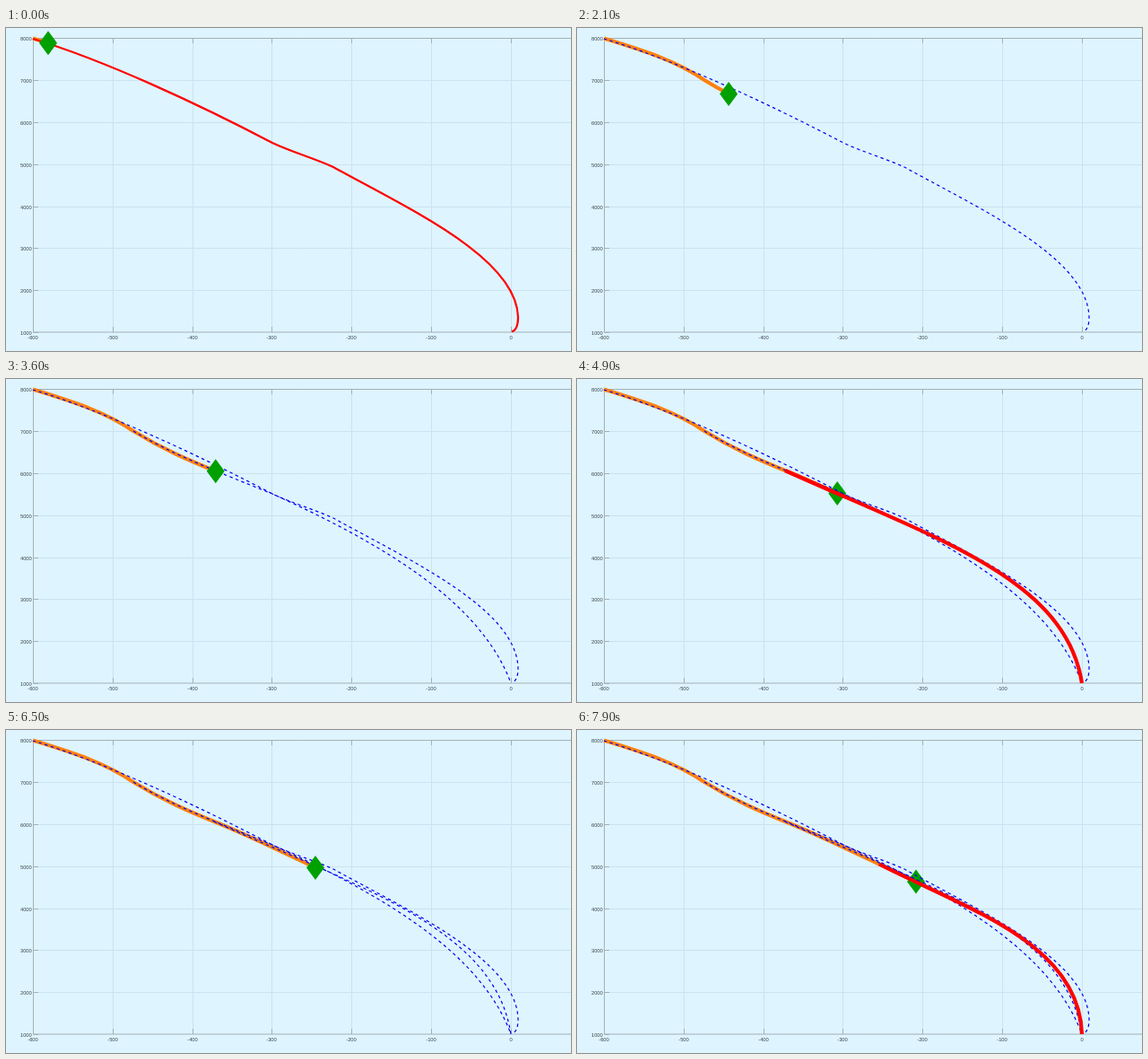
These frames come from a looping animation (630x360 px, 8000 ms). An HTML page with a canvas:

```html
<!DOCTYPE html>
<html lang="en">
<head>
<meta charset="utf-8">
<title>Trajectory replanning</title>
<style>
html, body { margin: 0; width: 100%; height: 100%; overflow: hidden; background: #def4ff; }
canvas { display: block; width: 630px; height: 360px; }
</style>
</head>
<body>
<canvas id="stage" width="630" height="360"></canvas>
<script>
const ctx = document.getElementById("stage").getContext("2d");
const LOOP = 8000, TICK = 100, REPLAN = 2430, LIFT = 700;
const RED = "#ff0000", ORANGE = "#ff8010", BLUE = "#0000f0", GREEN = "#00a000";
const GRID = "#cae3ee", AXIS = "#a3b0b6", TEXT = "#3c4448";

// Chains of cubic Béziers: start point, then two controls and an end per segment
const plans = [
  [30, 12, 110, 36, 215, 85, 297, 128, 318, 138, 343, 145, 365, 155,
    450, 202, 569, 256, 571, 322, 571, 331, 569, 337, 564, 338.5],
  [142, 58, 185, 84, 240, 105, 297, 128, 425, 186, 530, 250, 563, 339],
  [232, 102, 398, 177, 545, 222, 563, 339],
  [337, 149.5, 438, 201, 560, 238, 563, 339]
];
const track = [30, 11.5, 70, 24, 108, 35, 142, 58, 176, 79, 205, 91, 232, 102, 280, 121, 330, 147, 380, 170];

// Marker x over time
const pace = [[0, 47], [1300, 135], [2800, 199], [5700, 325], [6900, 355], [7900, 378]];

function markerX(t) {
  let i = 1;
  while (i < pace.length - 1 && pace[i][0] < t) i++;
  const [t0, x0] = pace[i - 1], [t1, x1] = pace[i];
  return x0 + (x1 - x0) * Math.min(1, (t - t0) / (t1 - t0));
}

function bezier(a, b, c, d, u) {
  const v = 1 - u;
  return v * v * v * a + 3 * v * v * u * b + 3 * v * u * u * c + u * u * u * d;
}

// Height of a left-to-right chain at x, by bisection
function heightAt(path, x) {
  let i = 0;
  while (i + 8 < path.length && path[i + 6] < x) i += 6;
  const at = (k, u) => bezier(path[i + k], path[i + k + 2], path[i + k + 4], path[i + k + 6], u);
  let lo = 0, hi = 1;
  for (let n = 0; n < 20; n++) {
    const mid = (lo + hi) / 2;
    if (at(0, mid) < x) lo = mid; else hi = mid;
  }
  return at(1, lo);
}

function drawCurve(path, color, width, dash = []) {
  ctx.strokeStyle = color;
  ctx.lineWidth = width;
  ctx.setLineDash(dash);
  ctx.beginPath();
  ctx.moveTo(path[0], path[1]);
  for (let i = 2; i < path.length; i += 6) ctx.bezierCurveTo(...path.slice(i, i + 6));
  ctx.stroke();
  ctx.setLineDash([]);
}

function line(x1, y1, x2, y2, color) {
  ctx.strokeStyle = color;
  ctx.lineWidth = 1;
  ctx.beginPath();
  ctx.moveTo(x1, y1);
  ctx.lineTo(x2, y2);
  ctx.stroke();
}

function label(value, x, y, align) {
  ctx.fillStyle = TEXT;
  ctx.textAlign = align;
  ctx.fillText(String(value), x, y);
}

function drawAxes() {
  ctx.fillStyle = "#def4ff";
  ctx.fillRect(0, 0, 630, 360);
  const gridX = i => Math.round(30 + i * 88.75) + 0.5;
  const gridY = i => Math.round(11.3 + i * 46.8) + 0.5;
  const left = gridX(0), top = gridY(0), bottom = 339;

  for (let i = 1; i < 7; i++) {
    line(gridX(i), top, gridX(i), bottom, GRID);
    line(left, gridY(i), 630, gridY(i), GRID);
  }
  line(left, top, left, bottom, AXIS);
  line(left, top, 630, top, AXIS);
  line(left, bottom, 630, bottom, AXIS);

  ctx.font = "5.8px 'Liberation Sans', Arial, sans-serif";
  ctx.textBaseline = "middle";
  for (let i = 0; i < 8; i++) {
    line(left, gridY(i), left + 5.5, gridY(i), AXIS);
    label(8000 - i * 1000, 28.8, gridY(i) + 0.5, "right");
  }
  for (let i = 0; i < 7; i++) {
    line(gridX(i), bottom - 6, gridX(i), bottom, AXIS);
    line(gridX(i), top, gridX(i), top + 5.5, AXIS);
    label(i * 100 - 600, gridX(i) - 0.5, 345.5, "center");
  }
}

function drawTrack(x) {
  ctx.save();
  ctx.beginPath();
  ctx.rect(0, 0, x, 360);
  ctx.clip();
  drawCurve(track, ORANGE, 4.2);
  ctx.restore();
}

function drawMarker(x, y) {
  ctx.fillStyle = GREEN;
  ctx.beginPath();
  ctx.moveTo(x, y - 13.5);
  ctx.lineTo(x + 10, y);
  ctx.lineTo(x, y + 13.5);
  ctx.lineTo(x - 10, y);
  ctx.fill();
}

function draw(ms) {
  const t = Math.floor(ms / TICK) * TICK;
  const x = markerX(t), y = heightAt(track, x);
  const n = Math.floor(t / REPLAN);

  // A plan is dropped once the marker reaches the start of the next one
  const active = n + 1 >= plans.length || x < plans[n + 1][0];
  const under = active && n > 0 && t % REPLAN < LIFT;

  drawAxes();
  drawTrack(x);
  if (under) drawMarker(x, y);
  plans.slice(0, active ? n : n + 1).forEach(p => drawCurve(p, BLUE, 1.2, [3.5, 3.5]));
  if (active) drawCurve(plans[n], RED, n ? 4.2 : 2.2);
  if (!under) drawMarker(x, y);
}

const start = performance.now();
function loop() {
  draw((performance.now() - start) % LOOP);
  requestAnimationFrame(loop);
}
loop();
</script>
</body>
</html>
```
